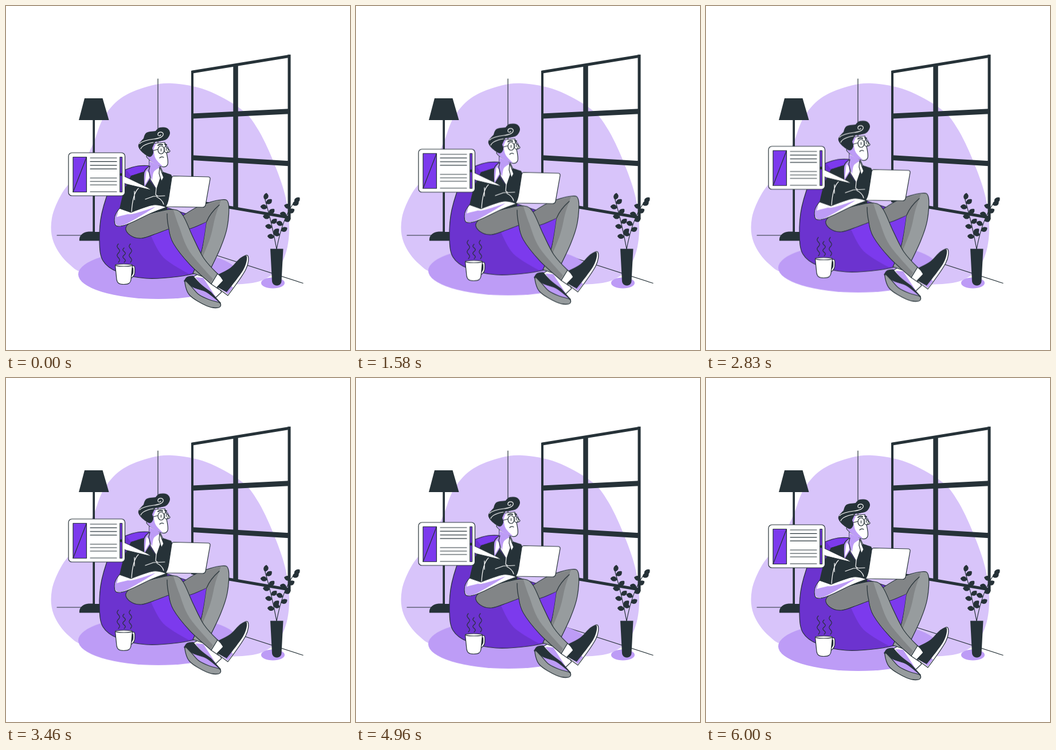
Write an HTML page that moves like this. It is 600x600 px and loops after 6.04 s.

```html
<!DOCTYPE html>
<html lang="en">
<head>
<meta charset="utf-8">
<title>Reading in a beanbag</title>
<style>
  html, body { margin: 0; width: 100%; height: 100%; overflow: hidden; background: #fff; }
  svg { display: block; width: 100vw; height: 100vh; }
  :root { --ink: #263238; --violet: #7c3aed; --deep: #6c33cf; --mid: #bd9cf6; --pale: #d8c4fa; --grey: #979c9e; --shade: #828587; }
  .ink { fill: var(--ink); }
  .violet { fill: var(--violet); }
  .deep { fill: var(--deep); }
  .mid { fill: var(--mid); }
  .pale { fill: var(--pale); }
  .grey { fill: var(--grey); }
  .shade { fill: var(--shade); }
  .white { fill: #fff; }
  .line, .chalk { fill: none; }
  .edge, .line, .chalk { stroke: var(--ink); stroke-width: 1.2; stroke-linecap: round; stroke-linejoin: round; }
  .chalk { stroke: #fff; }
  #window { fill: none; stroke: var(--ink); }
  #float { animation: float 6040ms linear infinite; }
  @keyframes float {
    0%, 99.338%, 100% { transform: translateY(0); }
    49.669% { transform: translateY(-12px); }
  }
</style>
</head>
<body>
<!-- data-k: key points of a smooth closed outline, "!" marks a sharp corner -->
<svg viewBox="0 0 600 600">
  <!-- room -->
  <path class="pale" data-k="290 135, 245 141, 200 161, 170 195, 152 240, 128 288, 98 326, 80 370, 83 412, 110 450, 150 468, 290 482, 412 485, 462 470, 486 437, 494 390, 488 335, 468 275, 440 216, 410 180, 350 147"/>
  <path class="line" d="M265 127V240M89 400H135M330 423L518 483.500"/>
  <g id="window"></g>

  <!-- lamp -->
  <path class="ink" d="M137 161H168.500L179.500 199H127ZM151.300 198H155V394H163V409.500H128C127 400 135 394 144 393.500H151.300Z"/>

  <!-- plant -->
  <ellipse class="mid" cx="465.500" cy="483" rx="20.500" ry="9.500"/>
  <g id="plant"></g>
  <path class="ink" d="M461 423.500H483.500L480.500 480C480 490 465 490 464 480Z"/>

  <g id="float">
    <ellipse class="mid" cx="265.500" cy="468" rx="139.500" ry="43"/>

    <!-- beanbag -->
    <path class="deep edge" data-k="207 286!, 230 279, 258 279!, 276 350!, 350 374!, 350 420, 344 463!, 300 472, 244 475, 195 464, 169 444, 163 410, 167 362, 185 309"/>
    <path class="violet" data-k="251 396!, 274 438, 319 467!, 343 462!, 349 420, 349 375!, 310 380!"/>
    <path class="violet" data-k="210 286!, 230 280, 252 279!, 245 290!, 218 296!"/>

    <!-- back leg and foot -->
    <path class="white edge" data-k="327 472!, 345 462!, 362 480!, 376 499!, 362 512!, 340 490!"/>
    <path class="mid" data-k="330 473!, 344 474!, 372 517!, 350 498!"/>
    <path class="grey edge" data-k="300 372!, 335 350, 375 338, 388 345, 386 385, 374 422, 349 474!, 326 466!, 341 428, 350 376!, 325 387, 300 393!"/>
    <path class="shade" data-k="301 373!, 335 351, 375 339!, 365 368, 355 408, 331 465!, 342 428, 350 376!, 325 386, 301 392!"/>
    <path class="line" d="M372 347Q356 361 350 376"/>
    <path class="ink edge" data-k="311 480!, 316 473, 326 471!, 340 486, 357 499!, 374 518!, 340 507"/>
    <path class="mid edge" data-k="311 479!, 328 491, 350 499, 374 518!, 350 515, 325 501"/>
    <path class="grey edge" data-k="312 480, 322 488, 336 503, 354 512, 373 518, 371 526, 350 523, 320 504"/>

    <!-- neck and chest -->
    <path class="white edge" data-k="250 268!, 249 288!, 252 303!, 263 321!, 275 293!, 268 278!"/>
    <path class="mid" data-k="250 270!, 270 281!, 258 289, 255 304!, 249 291!"/>

    <!-- shirt -->
    <path class="ink" data-k="218 296!, 240 289!, 251 304!, 262 320!, 267 305!, 273 289!, 288 294!, 291 300!, 281 351!, 285 389!, 245 403!, 225 362!, 198 354!, 206 322"/>
    <path class="mid edge" data-k="251 279!, 241 290, 241 318!, 252 300!, 249 287!"/>
    <path class="white" data-k="245 287!, 249 291!, 250 299!, 242 312!"/>
    <path class="white edge" data-k="268 281!, 275 299!, 271 306!, 267 292!"/>
    <path class="chalk" d="M231 318Q221 327 219 359M224 323V338M262 318L261 329L264 331M243 337L257 332L277 331M263 333Q273 338 275 346"/>

    <!-- head -->
    <path class="white edge" data-k="254 240!, 277 238!, 279 246!, 286 253, 280 256!, 282 276, 271 280, 250 268!, 245 262, 250 256"/>
    <path class="mid" data-k="254 241!, 262 240!, 258 250, 261 266, 274 280!, 262 277, 250 268!, 246 262, 250 256"/>
    <path class="ink" data-k="231 242, 240 231!, 245 221, 261 218!, 268 212, 281 213, 286 222, 279 233, 260 237!, 255 248!, 257 256, 252 263, 244 260, 234 251"/>
    <path class="chalk" d="M233 240Q240 234 258 232C267 231 276 228 274 222C271 218 264 220 265 225Q267 228 270 225M235 249Q239 241 257 238"/>
    <g class="line">
      <ellipse cx="270.500" cy="251" rx="5.500" ry="7"/>
      <ellipse cx="279.500" cy="250" rx="3.500" ry="6"/>
      <path d="M265 250L254 253M268 265Q271 262 275 264"/>
      <path d="M265 243Q269 240 273 242M277 241L280 242" stroke-width="2"/>
    </g>
    <path class="line" d="M270.500 249V253M279.500 248.500V252"/>

    <!-- front leg -->
    <path class="grey edge" data-k="209 387, 224 373, 260 360, 293 355, 309 366, 326 403, 345 440, 370 468!, 358 485!, 320 450, 292 414, 284 388!, 262 397, 236 405, 217 400"/>
    <path class="shade" data-k="210 387, 224 374, 260 361, 292 356!, 302 385, 320 428, 361 476!, 357 483!, 320 449, 293 414, 285 388!, 262 396, 236 404, 217 399"/>
    <path class="line" d="M281 362Q281 376 284 388"/>

    <!-- front shoe -->
    <path class="white edge" data-k="358 485!, 369 467!, 383 479!, 371 494!"/>
    <path class="white edge" data-k="372 468!, 392 457, 409 440, 422 436, 418 460, 387 505!, 368 491!, 379 479!"/>
    <path class="mid" data-k="371 491!, 387 503!, 396 491!, 388 485!"/>
    <path class="ink" data-k="371 468!, 392 457, 409 440, 420 437, 414 460, 385 499!, 368 490!, 379 479!"/>

    <!-- forearm and laptop -->
    <path class="white edge" data-k="198 353!, 218 360!, 257 347, 280 351!, 254 361, 211 381, 192 383, 190 367"/>
    <path class="mid" data-k="195 359!, 219 363, 261 350!, 235 366, 205 382, 192 381, 190 369"/>
    <path class="white" data-k="197 355!, 216 362!, 193 368!"/>
    <path class="white edge" d="M293 296.500L353 298Q356.500 298.500 356 302L348 347Q347 351 343 351L278 350Q282 346 284 333L289 300Q290 296.500 293 296.500Z"/>

    <!-- tablet -->
    <path class="white edge" d="M203 295.500L257 322L203 309Z"/>
    <rect class="white edge" x="109" y="256" width="98.500" height="75" rx="6"/>
    <path class="white" d="M204 296.500L250 318.500L204 308Z"/>
    <path class="violet edge" d="M117 263.500H140.500V324.500H117ZM198.800 263.500H202.500V324.500H198.800Z"/>
    <path class="line" d="M140.500 263.500L117 324.500"/>
    <path class="line" id="text"/>
    <circle class="ink" cx="200.700" cy="294" r="2.400"/>

    <!-- mug -->
    <path class="white edge" data-k="218 455!, 224 454, 224 468, 217 476!"/>
    <path class="ink" data-k="219 457!, 222 456!, 222 466, 218 472!"/>
    <path class="white edge" d="M190.500 452H220.500L218 477C217 484 213 485.500 205 485.500C197 485.500 194 483 193 477Z"/>
    <ellipse class="white edge" cx="205.500" cy="452" rx="15" ry="2"/>
    <path class="line" id="steam"/>
  </g>
</svg>
<script>
  const $ = id => document.getElementById(id);
  const range = n => Array.from({ length: n }, (_, i) => i);
  const mix = (a, b, t) => a + (b - a) * t;

  // Closed Catmull-Rom outline; corners have no tangent
  function outline(keys) {
    const pts = keys.split(",").map(k => {
      const [x, y] = k.trim().split(" ").map(parseFloat);
      return { x, y, sharp: k.includes("!") };
    });
    const at = i => pts[(i + pts.length) % pts.length];
    const handle = (i, sign) => {
      const p = at(i), a = at(i - 1), b = at(i + 1), s = p.sharp ? 0 : sign / 6;
      return `${p.x + (b.x - a.x) * s} ${p.y + (b.y - a.y) * s}`;
    };
    const curves = pts.map((_, i) =>
      `C${handle(i, 1)} ${handle(i + 1, -1)} ${at(i + 1).x} ${at(i + 1).y}`);
    return `M${pts[0].x} ${pts[0].y}${curves.join("")}Z`;
  }
  for (const path of document.querySelectorAll("[data-k]"))
    path.setAttribute("d", outline(path.dataset.k));

  // Window frame in perspective: u runs left to right, v top to bottom
  const spot = (u, v) => `${mix(325, 494, u)} ${mix(mix(115, 340, v), mix(87.5, 369, v), u)}`;
  const bar = (u1, v1, u2, v2, width) =>
    `<path d="M${spot(u1, v1)}L${spot(u2, v2)}" stroke-width="${width}"/>`;
  $("window").innerHTML =
    [0, 1].map(v => bar(0, v, 1, v, 5)).join("") +
    [0.342, 0.665].map(v => bar(0, v, 1, v, 9)).join("") +
    bar(0, -0.01, 0, 1.01, 4) + bar(0.447, 0, 0.447, 1, 8.5) + bar(1, -0.01, 1, 1.01, 5);

  // A stem is a quadratic curve with leaves in pairs and one at the tip
  function stem(bendX, bendY, tipX, tipY, tipAngle, lean) {
    const quad = (a, b, c, t) => mix(mix(a, b, t), mix(b, c, t), t);
    const leaf = (t, angle) => `<path class="ink" d="M0 0C2 -6 8 -6 12 -2C10 5 4 5 0 0Z"
      transform="translate(${quad(472, bendX, tipX, t)} ${quad(424, bendY, tipY, t)}) rotate(${angle})"/>`;
    const pairs = range(4).map(i => {
      const t = 0.24 + 0.2 * i;
      return leaf(t, 197 + lean) + leaf(t + 0.08, -28 + lean);
    });
    return `<path class="line" d="M472 424Q${bendX} ${bendY} ${tipX} ${tipY}"/>` + pairs.join("") + leaf(1, tipAngle);
  }
  $("plant").innerHTML = stem(464, 380, 452, 338, -70, 0) + stem(482, 370, 503, 342, -32, 12);

  // Two paragraphs and a last line
  const rows = [...range(4).map(i => 265 + 6.4 * i), ...range(3).map(i => 300 + 6 * i), 324];
  $("text").setAttribute("d", rows.map(y => `M147 ${y}H193`).join(""));

  const wave = (x, top) => "M" + range(33).map(i =>
    `${x - 2.2 * Math.sin(i / 32 * Math.PI * 4)} ${mix(top, 447, i / 32)}`).join("L");
  $("steam").setAttribute("d", wave(196, 415) + wave(206, 422) + wave(217, 415));
</script>
</body>
</html>
```
